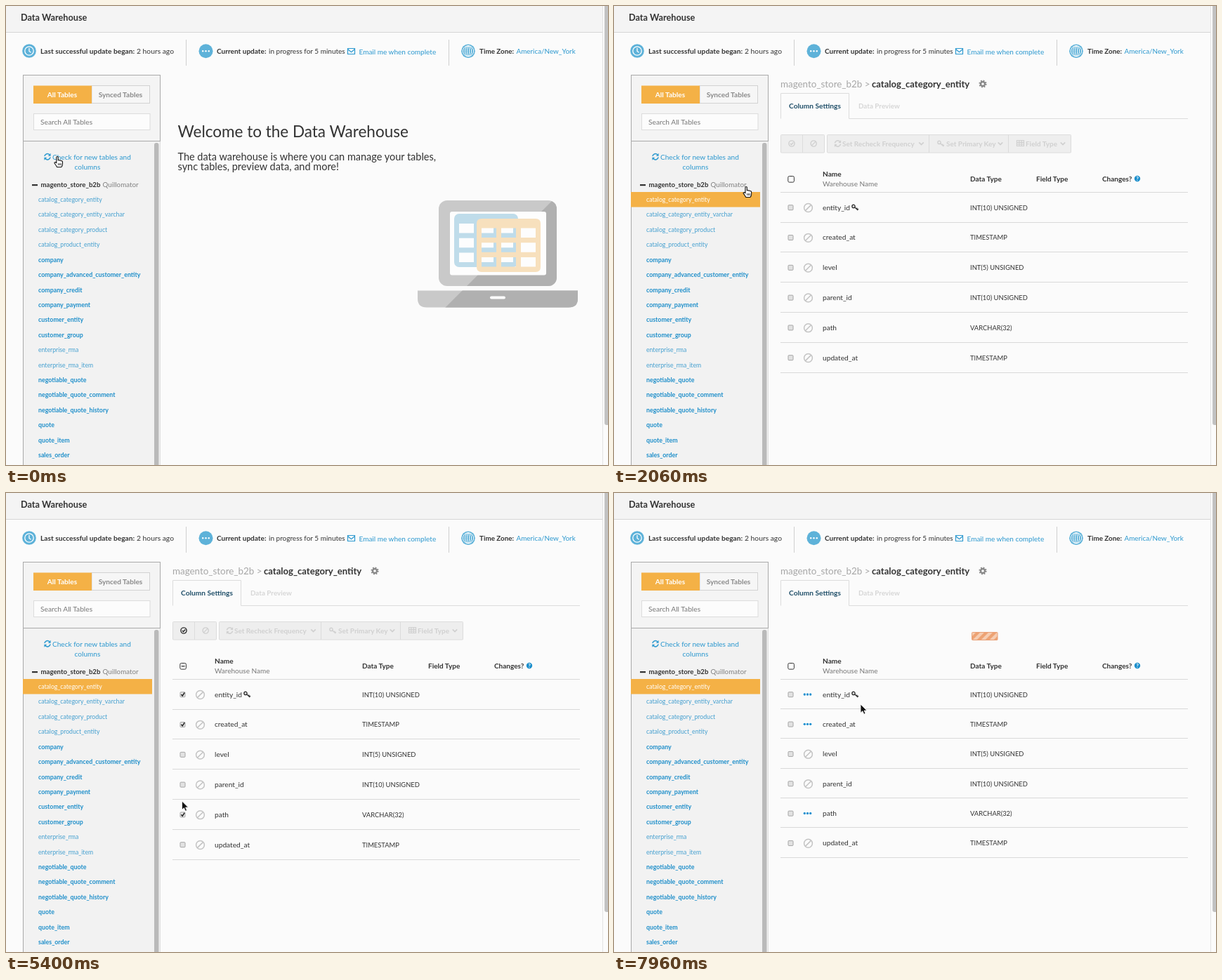
An HTML page for the animation above (8000 ms loop, 857x654 px).

```html
<!DOCTYPE html>
<html lang="en">
<head>
<meta charset="utf-8">
<title>Data Warehouse</title>
<style>
  html, body { margin: 0; width: 100%; height: 100%; overflow: hidden; background: #fbfbfb; }
  svg { display: block; font-family: Lato, "Open Sans", sans-serif; }
</style>
</head>
<body>
<svg id="stage" width="857" height="654" viewBox="0 0 857 654"></svg>
<script>
const LOOP = 8000;
const BLUE = '#2b98cf', ORANGE = '#f4b146', INK = '#333', PALE = '#d0d0d0';

// ---- drawing helpers ----
const text = (x, y, str, { size = 10.15, fill = INK, bold, mid } = {}) =>
  `<text x="${x}" y="${y}" font-size="${size}" fill="${fill}"${bold ? ' font-weight="700"' : ''}${mid ? ' text-anchor="middle"' : ''}>${str}</text>`;
const rect = (x, y, w, h, fill, stroke = 'none', r = 0) =>
  `<rect x="${x}" y="${y}" width="${w}" height="${h}" rx="${r}" fill="${fill}" stroke="${stroke}"/>`;
const disc = (x, y, r, fill) => `<circle cx="${x}" cy="${y}" r="${r}" fill="${fill}"/>`;
const path = (d, stroke, width = 1, fill = 'none') =>
  `<path d="${d}" fill="${fill}" stroke="${stroke}" stroke-width="${width}"/>`;
const group = (id, body) => `<g id="${id}">${body}</g>`;
const at = (x, y, body) => `<g transform="translate(${x} ${y})">${body}</g>`;
const range = n => [...Array(n).keys()];

// ---- icons ----
const gear = (x, y) => at(x, y,
  `<circle r="4.5" fill="none" stroke="#888" stroke-width="2.2" stroke-dasharray="1.77"/>` +
  `<circle r="3" fill="none" stroke="#888" stroke-width="2.3"/>`);
const refresh = (x, y, color) => at(x, y,
  path('M-4.1 -.7A4.1 4.1 0 0 1 3 -2.8M4.1 .7A4.1 4.1 0 0 1 -3 2.8', color, 1.5) +
  path('M4.6 -5V-1H.8ZM-4.6 5V1H-.8Z', 'none', 0, color));
const key = (x, y, color) => at(x, y,
  `<circle cx="-2" cy="-1.6" r="2.1" fill="none" stroke="${color}" stroke-width="1.4"/>` +
  path('M-.4 -.2L4.3 4M2 2.1L3.4 .7M3.5 3.2L4.8 2', color, 1.4));
const ban = (x, y, r, color, w) => at(x, y,
  `<circle r="${r}" fill="none" stroke="${color}" stroke-width="${w}"/>` +
  path(`M${-r * .7} ${r * .7}L${r * .7} ${-r * .7}`, color, w));
const chevron = x => path(`M${x - 3.2} 194.4l3.2 3.2 3.2 -3.2`, PALE, 1.7);
const dots = (x, y, gap, r, fill) => [-1, 0, 1].map(i => disc(x + i * gap, y, r, fill)).join('');
const tick = (x, y) => path(`M${x - 2.2} ${y}l1.8 2 3 -4.6`, '#222', 1.5);

// ---- static page ----
function page() {
  return rect(0, 0, 857, 654, '#fbfbfb') + rect(0, 0, 849, 37, '#f4f4f4') +
    path('M0 37.5H849', '#d6d6d6') + path('M849.5 0V654', '#e3e3e3') +
    rect(852, -6, 8, 603, '#c2c2c2', 'none', 3) +
    text(21, 20.5, 'Data Warehouse', { size: 12.7, bold: 1 }) +
    path('M256.5 48V85M630.5 48V85', '#cfcfcf') +
    disc(33, 64, 9.8, '#5eb2d9') +
    `<circle cx="33" cy="64" r="6.2" fill="none" stroke="#fff" stroke-width="1.3"/>` +
    path('M33 60V64.5L35.6 66.3', '#fff', 1.3) +
    text(49, 68, 'Last successful update began:', { size: 10.2, bold: 1 }) +
    text(186, 68, '2 hours ago', { size: 10.3 }) +
    disc(284.5, 64.2, 10, '#5eb2d9') + dots(284.5, 64.2, 4.3, 1.2, '#fff') +
    text(300, 68, 'Current update:', { size: 10.05, bold: 1 }) +
    text(374, 68, 'in progress for 5 minutes', { size: 10 }) +
    path('M486.5 60.5h10v8h-10zM486.5 61.5l5 4.2 5 -4.2', BLUE, 1.2) +
    text(502.5, 68.5, 'Email me when complete', { size: 10.03, fill: BLUE }) +
    disc(658, 64.2, 9.8, '#5eb2d9') +
    `<circle cx="658" cy="64.2" r="7.6" fill="none" stroke="#fff"/>` +
    `<ellipse cx="658" cy="64.2" rx="4.6" ry="7.6" fill="none" stroke="#fff"/>` +
    `<ellipse cx="658" cy="64.2" rx="1.6" ry="7.6" fill="none" stroke="#fff"/>` +
    text(674, 68, 'Time Zone:', { size: 9.9, bold: 1 }) +
    text(726.5, 68, 'America/New_York', { size: 9.9, fill: BLUE });
}

const TABLES = `catalog_category_entity catalog_category_entity_varchar catalog_category_product
catalog_product_entity company company_advanced_customer_entity company_credit company_payment
customer_entity customer_group enterprise_rma enterprise_rma_item negotiable_quote
negotiable_quote_comment negotiable_quote_history quote quote_item sales_order`.split(/\s+/);

function sidebar() {
  const item = (i, fill, bold) =>
    text(46, 279 + i * 21.42, TABLES[i], { size: bold ? 8.84 : 8.7, fill, bold });
  const list = TABLES.map((name, i) =>
    /^(catalog|enterprise)/.test(name) ? item(i, '#45a0d0') : item(i, '#1f8fca', true)).join('');
  return rect(24.5, 192.5, 195, 470, '#f2f2f2', '#dedede') + path('M24.5 192V654', '#aaa') +
    rect(24.5, 98.5, 195, 94, '#f4f4f4', '#aaa') +
    rect(211, 195, 6.5, 470, '#bababa', 'none', 3) +
    rect(122, 113.5, 82.5, 25, '#f6f6f6', '#d2d2d2') + rect(39, 113.5, 83, 25.5, ORANGE) +
    text(80, 129.8, 'All Tables', { fill: '#fff', bold: 1, mid: 1 }) +
    text(163, 129.8, 'Synced Tables', { fill: '#8a8a8a', bold: 1, mid: 1 }) +
    rect(39.5, 153.5, 165.5, 23, '#fcfcfc', '#dcdcdc') +
    text(49, 168.7, 'Search All Tables', { size: 10.2, fill: '#777' }) +
    refresh(59, 214.7, BLUE) +
    text(66, 218.7, 'Check for new tables and', { size: 10.1, fill: BLUE }) +
    text(116, 233, 'columns', { size: 10.1, fill: BLUE, mid: 1 }) +
    rect(37, 254, 8, 2.2, INK) +
    text(49.5, 258.3, 'magento_store_b2b', { size: 9.65, bold: 1 }) +
    text(137.5, 258.3, 'Quillomator', { size: 9.75, fill: '#808080' }) +
    list +
    group('hover', rect(25, 265, 183, 21.5, '#e6e6e6') + item(0, '#45a0d0')) +
    group('picked', rect(24, 265, 184, 21.5, ORANGE) + item(0, '#fff'));
}

// ---- welcome view ----
function laptop() {
  const box = (x, y, w, h) => `M${x} ${y}h${w}v${h}h${-w}z`;
  const cells = (x, y) => range(9).map(i => box(x + i % 3 * 28, y + (i / 3 | 0) * 20.7, 21, 13.5)).join('');
  const body = rect(616, 277, 168, 122, '#c9c9c9', 'none', 12) +
    path('M586 405.5H814V417Q814 429.5 801 429.5H599Q586 429.5 586 417Z', 'none', 0, '#c9c9c9');
  return `<clipPath id="shade"><path d="M778 277H820V430H625Z"/></clipPath>` + body +
    `<g clip-path="url(#shade)">${body.replaceAll('#c9c9c9', '#b0b0b0')}</g>` +
    rect(632, 293, 137, 90.5, '#fdfdfd', 'none', 3) + rect(689, 413.5, 22, 4, '#fdfdfd', 'none', 2) +
    rect(638, 296, 91, 76, '#bfdcea', 'none', 7) + path(cells(645, 310), 'none', 0, '#fdfdfd') +
    `<path fill="#f7e0bd" fill-rule="evenodd" d="M677 303H754Q761 303 761 310V372Q761 379 754 379H677Q670 379 670 372V310Q670 303 677 303Z${cells(677, 316.5)}"/>`;
}

function welcome() {
  return text(244.5, 187, 'Welcome to the Data Warehouse', { size: 22.5 }) +
    text(244.5, 220, 'The data warehouse is where you can manage your tables,', { size: 14.49 }) +
    text(244.5, 234.3, 'sync tables, preview data, and more!', { size: 14.49 }) + laptop();
}

// ---- table view ----
const COLUMNS = [['entity_id', 'INT(10) UNSIGNED'], ['created_at', 'TIMESTAMP'], ['level', 'INT(5) UNSIGNED'],
  ['parent_id', 'INT(10) UNSIGNED'], ['path', 'VARCHAR(32)'], ['updated_at', 'TIMESTAMP']];
const CHECKS = [[0, 3720], [1, 4340], [4, 5230]];

function rows(pending) {
  const step = pending ? 42.35 : 42.8;
  return COLUMNS.map(([name, type], i) => {
    const y = 287 + i * step;
    const busy = pending && CHECKS.some(([row]) => row === i);
    return rect(248, y - 3.3, 7, 7, '#e2e2e2', '#a6a6a6', 1) +
      (busy ? dots(275.5, y, 4.2, 1.65, '#1c90d0') : ban(276.5, y + .5, 5.9, '#c4c4c4', 1.5)) +
      text(297, y + 3.6, name, { size: 10.2 }) + text(507, y + 3.6, type, { size: 9.4 }) +
      path(`M237 ${Math.round(y + (pending ? 19.8 : 20.5)) + .5}H817`, '#d9d9d9');
  }).join('') + key(343, 287, INK);
}

function toolbar() {
  const label = (x, str) => text(x, 199.7, str, { size: 9.95, fill: PALE, bold: 1 });
  return rect(237.5, 183.5, 62, 25.5, '#eee', '#dcdcdc', 1) + rect(303.5, 183.5, 347, 25.5, '#eee', '#dcdcdc', 1) +
    path('M268.5 183V209M448.5 183V209M561.5 183V209', '#dcdcdc') +
    `<g id="sync" fill="none"><circle cx="253" cy="196" r="4.1" stroke-width="1.4"/><path d="M251 196l1.5 1.6 2.7 -3.1" stroke-width="1.5"/></g>` +
    ban(284.2, 196, 4.1, PALE, 1.4) +
    refresh(318.5, 196, PALE) + label(325, 'Set Recheck Frequency') + chevron(437.5) +
    key(465, 196, PALE) + label(473, 'Set Primary Key') + chevron(550) +
    path('M573.5 191.5h10v8h-10zM573.5 194.3h10M573.5 197h10M576.8 191.5v8M580.2 191.5v8', PALE, 1.2) +
    label(586, 'Field Type') + chevron(639);
}

function loader() {
  return `<pattern id="stripes" width="12" height="12" patternUnits="userSpaceOnUse">
      <rect width="12" height="12" fill="#eda272"/>
      <path d="M0 12L12 0H6L0 6ZM12 12V6L6 12Z" fill="#f6cdb2"/></pattern>` +
    rect(509.5, 198.5, 36.5, 11, 'url(#stripes)', '#e9a076', 1);
}

function tableView() {
  const head = (x, str) => text(x, 249.5, str, { size: 10, bold: 1 });
  return text(237, 115.5, 'magento_store_b2b &gt;', { size: 13.4, fill: '#a6a6a6' }) +
    text(367, 115.5, TABLES[0], { size: 13.07, bold: 1 }) + gear(525, 111) +
    path('M237.5 160.5V124.5H334.5V160.5H817', '#dcdcdc') +
    text(249, 146.3, 'Column Settings', { size: 10.2, fill: '#204f69', bold: 1 }) +
    text(348, 145.8, 'Data Preview', { size: 9.85, fill: '#d6d6d6', bold: 1 }) +
    group('toolbar', toolbar()) + group('loader', loader()) +
    rect(247.8, 242.5, 8.6, 8.6, '#fff', INK, 1.8) + group('partial', path('M249.7 246.8h4.8', INK, 1.3)) +
    text(297, 242.5, 'Name', { bold: 1 }) + text(297, 256.8, 'Warehouse Name', { size: 10, fill: '#777' }) +
    head(507, 'Data Type') + head(601, 'Field Type') + head(695, 'Changes?') +
    disc(745, 246, 4.2, '#1c8fcc') + text(745, 249, '?', { size: 8, fill: '#fff', bold: 1, mid: 1 }) +
    path('M237 265.5H817', '#d9d9d9') +
    group('idle', rows(false) + CHECKS.map(([row], i) => group('tick' + i, tick(251.6, 287 + row * 42.8))).join('')) +
    group('pending', rows(true));
}

const tooltip = (id, x, y, w, h, tip, str, size) => group(id,
  rect(x, y, w, h, '#555') + path(`M${tip - 4} ${y + h}h8l-4 4z`, 'none', 0, '#555') +
  text(x + w / 2, y + h / 2 + 3, str, { size, fill: '#fff', mid: 1 }));

stage.innerHTML = page() + sidebar() + group('welcome', welcome()) +
  group('title', text(237, 115.5, TABLES[0], { size: 13.07, bold: 1 }) + gear(395, 111)) +
  group('table', tableView()) +
  tooltip('tipBulk', 212, 200, 86, 18, 254.5, 'Bulk select columns', 9.1) +
  tooltip('tipSync', 151.5, 158, 202.5, 18, 253, 'Sync selected column(s) from your data warehouse', 9) +
  group('cursor',
    group('hand', path('M-1.2 9V1.3Q-1.2 0 0 0T1.2 1.3V5.2Q3 4.6 3.6 5.7Q5.2 5.2 5.8 6.3Q7.5 6 7.5 7.8V10.5Q7.5 13 5.8 15H-.4Q-2 12 -4 9.5Q-4.2 8 -2.8 8Z', '#111', 1.1, '#fff') +
      path('M1.6 9.5v3M3.4 9.5v3M5.2 9.5v3', '#111', .8)) +
    group('arrow', path('M0 0V12.3L2.9 9.7L4.9 14.2L7 13.3L5.1 9H9Z', '#fff', .8, '#111')));

// ---- motion ----
const CURSOR = [[0, 73, 214.5], [60, 73, 214.5], [120, 84, 234], [220, 84, 234], [580, 109, 272], [1370, 110, 272.5],
  [1640, 128, 272], [2490, 250, 242.5], [2700, 250, 242.5], [3360, 251, 284], [3640, 250.5, 285], [3720, 251, 294],
  [4160, 250.5, 330], [4330, 250.5, 330], [5050, 251, 457], [5230, 251, 457], [5400, 250.5, 439],
  [6010, 257, 197], [7200, 257, 197], [7960, 351, 301], [LOOP, 351, 301]];
const HAND = [[0, 3420], [5900, 6450]];

const show = (id, on) => document.getElementById(id).setAttribute('display', on ? 'inline' : 'none');
const ramp = (t, a, b) => Math.min(1, Math.max(0, (t - a) / (b - a)));
const fade = (id, t, [a, b, c, d]) =>
  document.getElementById(id).setAttribute('opacity', ramp(t, a, b) - ramp(t, c, d));

function cursorAt(t) {
  const i = CURSOR.findIndex(k => k[0] > t);
  const [t0, x0, y0] = CURSOR[i - 1], [t1, x1, y1] = CURSOR[i];
  const p = ramp(t, t0, t1), e = p * p * (3 - 2 * p);
  return [x0 + (x1 - x0) * e, y0 + (y1 - y0) * e];
}

function draw() {
  const t = performance.now() % LOOP;
  const opened = t >= 850, loaded = t >= 1880, synced = t >= 6450;
  const selecting = t >= CHECKS[0][1] && !synced;
  const hand = HAND.some(([a, b]) => t >= a && t < b);
  show('hover', t >= 490 && !opened);
  show('picked', opened);
  show('welcome', !opened);
  show('title', opened && !loaded);
  show('table', loaded);
  show('toolbar', !synced);
  show('loader', synced);
  show('idle', !synced);
  show('pending', synced);
  show('partial', selecting);
  CHECKS.forEach(([, time], i) => show('tick' + i, t >= time));
  document.getElementById('sync').setAttribute('stroke', selecting ? INK : PALE);
  document.getElementById('stripes').setAttribute('patternTransform', `translate(${-(t - 6450) * .02} 0)`);
  fade('tipBulk', t, [2490, 2850, 2950, 3150]);
  fade('tipSync', t, [5830, 6010, 6400, 6630]);
  show('hand', hand);
  show('arrow', !hand);
  document.getElementById('cursor').setAttribute('transform', `translate(${cursorAt(t)})`);
  requestAnimationFrame(draw);
}
draw();
</script>
</body>
</html>
```
